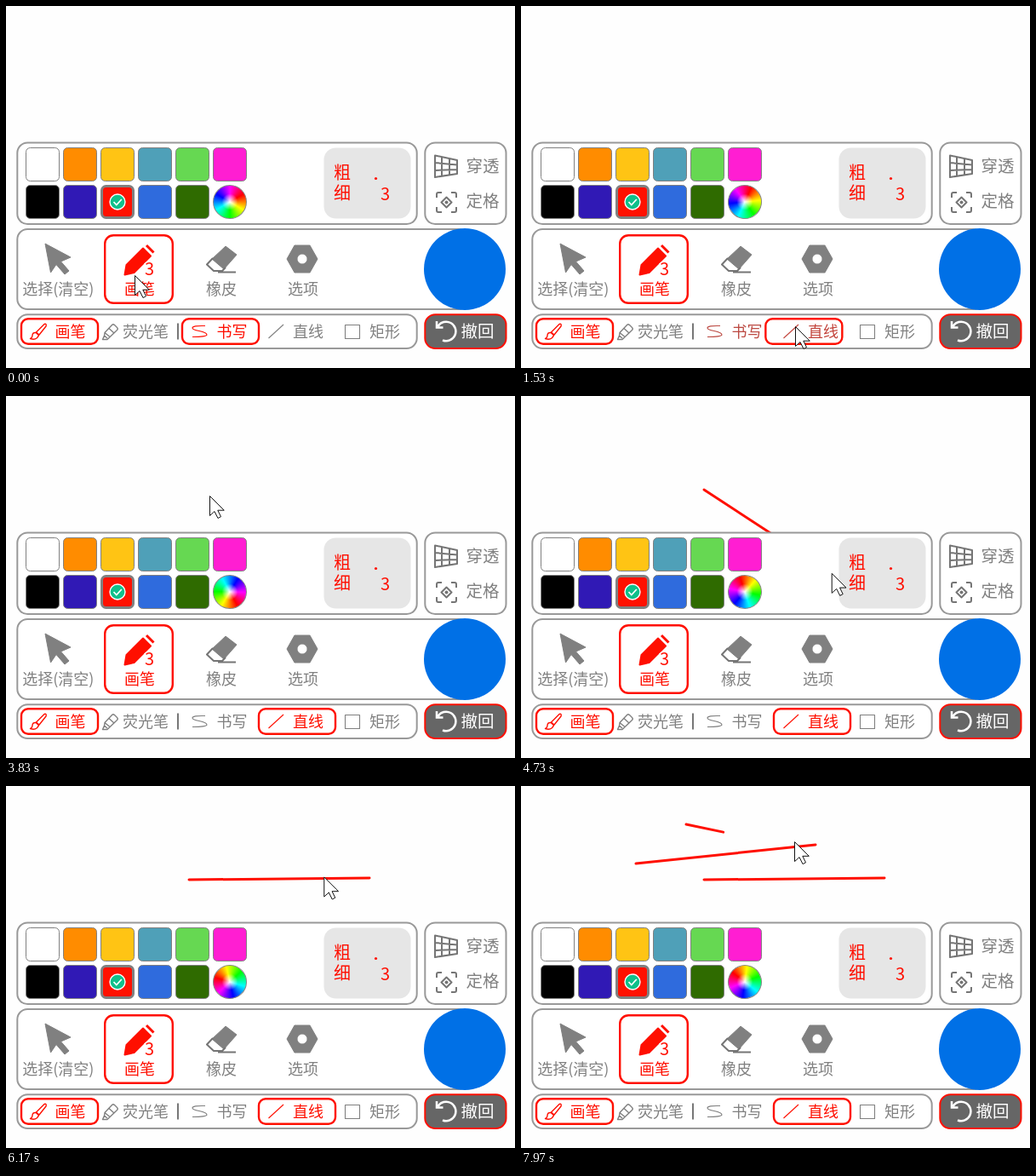
An HTML page that plays this animation: 598 px wide and 425 px high, repeating every 8000 ms.

```html
<!DOCTYPE html>
<html lang="zh">
<head>
<meta charset="utf-8">
<style>
  html, body { margin: 0; width: 100%; height: 100%; overflow: hidden; background: #fefefe; }
  svg { position: absolute; left: 0; top: 0; }
  text { font: 18px "Noto Sans CJK SC", "Noto Sans CJK", sans-serif; fill: #808080; }
  .large { font-size: 20px; }
  .panel { fill: #fff; stroke: #999; stroke-width: 2; }
  .choice { fill: #fff; stroke: #ff0f00; stroke-width: 2.4; }
  .red { fill: #ff0f00; }
  .gray { fill: #808080; stroke: #808080; stroke-linejoin: round; }
  .line { fill: none; stroke: #808080; stroke-width: 1.1; stroke-linejoin: round; }
  .bold { fill: none; stroke: #757575; stroke-width: 2; stroke-linejoin: round; }
  .ink { stroke: #ff0f00; stroke-width: 3; stroke-linecap: round; }
  #wheel { position: absolute; left: 243px; top: 210px; width: 38px; height: 38px;
    border: 1px solid #888; border-radius: 50%;
    background: radial-gradient(closest-side, #fff, #fff0 50%),
      conic-gradient(#f0f, #f00, #ff0, #0f0, #0ff, #00f, #f0f); }
</style>
</head>
<body>
<svg width="598" height="425">
  <g id="strokes"></g>

  <rect class="panel" x="13.3" y="160.5" width="469.4" height="95.5" rx="12"/>
  <rect class="panel" x="492.3" y="160.5" width="95.2" height="95.5" rx="12"/>
  <rect class="panel" x="13.3" y="262" width="530" height="94" rx="12"/>
  <rect class="panel" x="13.3" y="362.3" width="469.4" height="39.7" rx="12"/>
  <rect x="492.3" y="362.3" width="95.2" height="39.7" rx="12" fill="#666" stroke="#ff0f00" stroke-width="2"/>
  <circle cx="539" cy="309" r="48" fill="#0070e6"/>

  <g id="swatches"></g>
  <circle cx="131" cy="230" r="9" fill="#0fc08b" stroke="#fff" stroke-width="1.4"/>
  <path d="M126.5 230l3.3 3.5 6-6.5" fill="none" stroke="#fff" stroke-width="1.7"/>

  <rect x="373.5" y="166.5" width="102" height="83" rx="14" fill="#e6e6e6"/>
  <text class="red large" x="385" y="203">粗</text>
  <text class="red large" x="385" y="227">细</text>
  <text class="red large" x="440" y="227.5">3</text>
  <circle class="red" cx="434.5" cy="202.5" r="1.6"/>

  <path class="bold" d="M504 175.5L530 181V197L504 201ZM512 177.5V199.5M521 179.5V198M504 184L530 186.5M504 193L530 192"/>
  <text x="540.4" y="194.5" style="font-size:19.5px">穿透</text>
  <path class="bold" d="M506 225V221Q506 219 508 219H512M523 219H527Q529 219 529 221V225M529 236V240Q529 242 527 242H523M512 242H508Q506 242 506 240V236M517.5 224.5L523.5 230.5L517.5 236.5L511.5 230.5Z"/>
  <circle cx="517.5" cy="230.5" r="2" fill="#757575"/>
  <text x="540.4" y="236.2" style="font-size:19.5px">定格</text>

  <rect class="choice" x="116.2" y="269.2" width="79.6" height="79.6" rx="10"/>
  <path class="gray" d="M46 279L76 295L64.5 300L74 311L69 315L59 303.5L52.5 313Z"/>
  <path class="red" d="M139.5 315.5L141.5 304L161 284.5L170 293.5L150.5 313Z" stroke="#ff0f00" stroke-width="2" stroke-linejoin="round"/>
  <path d="M165 281L173.5 289.5" stroke="#ff0f00" stroke-width="3"/>
  <text class="red large" x="163" y="316" stroke="#fff" stroke-width="3" paint-order="stroke">3</text>
  <path class="gray" d="M242 297L258 282L271 292L256 309Z"/>
  <path class="bold" d="M243 296L236 303.5L244 311L254 311L258 307M249 312.5H270"/>
  <path class="gray" fill-rule="evenodd" d="M339 281H357L366 297L357 313H339L330 297ZM348 291a6 6 0 1 0 .01 0Z"/>
  <text x="19.2" y="339">选择(清空)</text>
  <text class="red" x="139" y="339">画笔</text>
  <text x="235" y="339">橡皮</text>
  <text x="331" y="339">选项</text>

  <rect class="choice" x="18" y="367.2" width="90" height="29.6" rx="8"/>
  <rect class="choice" id="marker" y="367.2" width="90" height="29.6" rx="8"/>
  <path class="line" style="stroke:#ff0f00;stroke-width:1.4" d="M45 373.5Q48 372.5 47 376L39 386L35.5 383ZM35 383.5Q31 383 31 387Q30.5 390 28.5 390.5Q36 393 38.5 386.5Z"/>
  <path class="line" style="stroke-width:1.4" d="M113.5 391.5H119L130.5 380.5Q132 379 130.5 377.5L127.5 374.5Q126 373 124.5 374.5L116 383.5L115.5 387ZM116 383.5L122 388.5M121 378.5L127 384M115.5 387L119 390"/>
  <path d="M202 372.5V391.5" stroke="#777" stroke-width="2"/>
  <path class="line" id="scriptIcon" d="M234 375.5Q219 375 219 378Q219 380 227 381.5Q236 383.5 236 386Q235 388.5 219 388.5"/>
  <path class="line" id="lineIcon" d="M308.5 390L326 374"/>
  <rect class="line" x="398.5" y="374.5" width="17" height="16"/>
  <text class="red" x="57.5" y="388.5">画笔</text>
  <text x="137" y="388.5">荧光笔</text>
  <text id="scriptText" x="247.5" y="388.5">书写</text>
  <text id="lineText" x="337" y="388.5">直线</text>
  <text x="427" y="388.5">矩形</text>

  <path d="M507.5 376A11.3 11.3 0 1 1 513 392.5M506 370V377.5H513.5" fill="none" stroke="#fff" stroke-width="2.5"/>
  <text x="534.5" y="388.5" style="font-size:19.5px;fill:#fff">撤回</text>
</svg>
<div id="wheel"></div>
<svg width="598" height="425">
  <path id="cursor" d="M.5 .5V23.5L6 18.5L10 26.5L13.5 24.7L9.8 17.2H17.3Z" fill="#fff" stroke="#111"/>
</svg>

<script>
const LOOP = 8000, LAG = 70, SPIN = 1700;
const byId = id => document.getElementById(id);

// Pointer path: [ms, x, y]
const path = [
  [0, 151, 316], [100, 151, 316], [500, 218, 332], [870, 271, 346],
  [1250, 320, 376], [1530, 322, 376], [1750, 322, 376],
  [2500, 165, 140], [2700, 122, 88], [2930, 122, 88],
  [3330, 244, 118], [3830, 239, 117], [4060, 215, 110], [4250, 215, 110],
  [4980, 420, 244], [5200, 420, 244], [5430, 428, 154], [5720, 427, 108], [5990, 427, 108],
  [6640, 136, 94], [6690, 135, 91], [6860, 311, 88], [6930, 316, 85],
  [7180, 346, 69], [7380, 346, 69], [7720, 194, 45], [7800, 194, 45],
  [7900, 237, 54], [7970, 320, 65], [8000, 346, 68]
];

// Drawn lines: [start ms, end ms]
const strokes = [[4200, 5850], [6690, 7370], [7790, 8100]];

function slope(i, axis) {
  if (!path[i - 1] || !path[i + 1]) return 0;
  const [a, b, c] = [path[i - 1], path[i], path[i + 1]];
  const before = (b[axis] - a[axis]) / (b[0] - a[0]);
  const after = (c[axis] - b[axis]) / (c[0] - b[0]);
  return before * after <= 0 ? 0 : 2 * before * after / (before + after);
}

function pointer(t) {
  const i = Math.max(0, path.findIndex(p => p[0] > t) - 1);
  const a = path[i], b = path[i + 1], span = b[0] - a[0], u = (t - a[0]) / span;
  return [1, 2].map(k => {
    const ease = u * u * (3 - 2 * u);
    return a[k] + (b[k] - a[k]) * ease +
      span * u * (1 - u) * (slope(i, k) * (1 - u) - slope(i + 1, k) * u);
  });
}

function blend(u) {
  const from = [128, 128, 128], to = [255, 15, 0];
  return `rgb(${from.map((v, i) => Math.round(v + (to[i] - v) * u))})`;
}

function paint(name, amount) {
  byId(name + "Text").style.fill = byId(name + "Icon").style.stroke = blend(amount);
}

const colors = ["#fff", "#ff8c00", "#ffc414", "#4fa0b8", "#66d852", "#ff1ed2",
  "#000", "#3019b5", "#ff1100", "#2f6bdd", "#2f6b00"];
byId("swatches").innerHTML = colors.map((color, i) => {
  const w = i === 8 ? 3 : 1;
  return `<rect x="${23 + i % 6 * 44 + w / 2}" y="${166 + (i > 5) * 44 + w / 2}" width="${40 - w}"
    height="${40 - w}" rx="5" fill="${color}" stroke="#808080" stroke-width="${w}"/>`;
}).join("");

byId("strokes").innerHTML = strokes.map(() => '<line class="ink"/>').join("");
const lines = [...byId("strokes").children];

function draw(t) {
  byId("cursor").setAttribute("transform", `translate(${pointer(t)})`);
  lines.forEach((line, i) => {
    const [start, end] = strokes[i];
    const tip = Math.min(t, end) - LAG;
    line.style.display = tip > start ? "" : "none";
    if (tip <= start) return;
    const [x1, y1] = pointer(start), [x2, y2] = pointer(tip);
    Object.entries({ x1, y1, x2, y2 }).forEach(([key, v]) => line.setAttribute(key, v));
  });

  const switched = Math.min(1, Math.max(0, (t - 1300) / 440));
  byId("marker").setAttribute("x", 297 - 90 * (1 - switched) ** 3);
  paint("script", 1 - switched);
  paint("line", switched);
  byId("wheel").style.transform = `rotate(${t / SPIN * 360}deg)`;
}

const begin = performance.now();
function tick() {
  draw((performance.now() - begin) % LOOP);
  requestAnimationFrame(tick);
}
tick();
</script>
</body>
</html>
```
